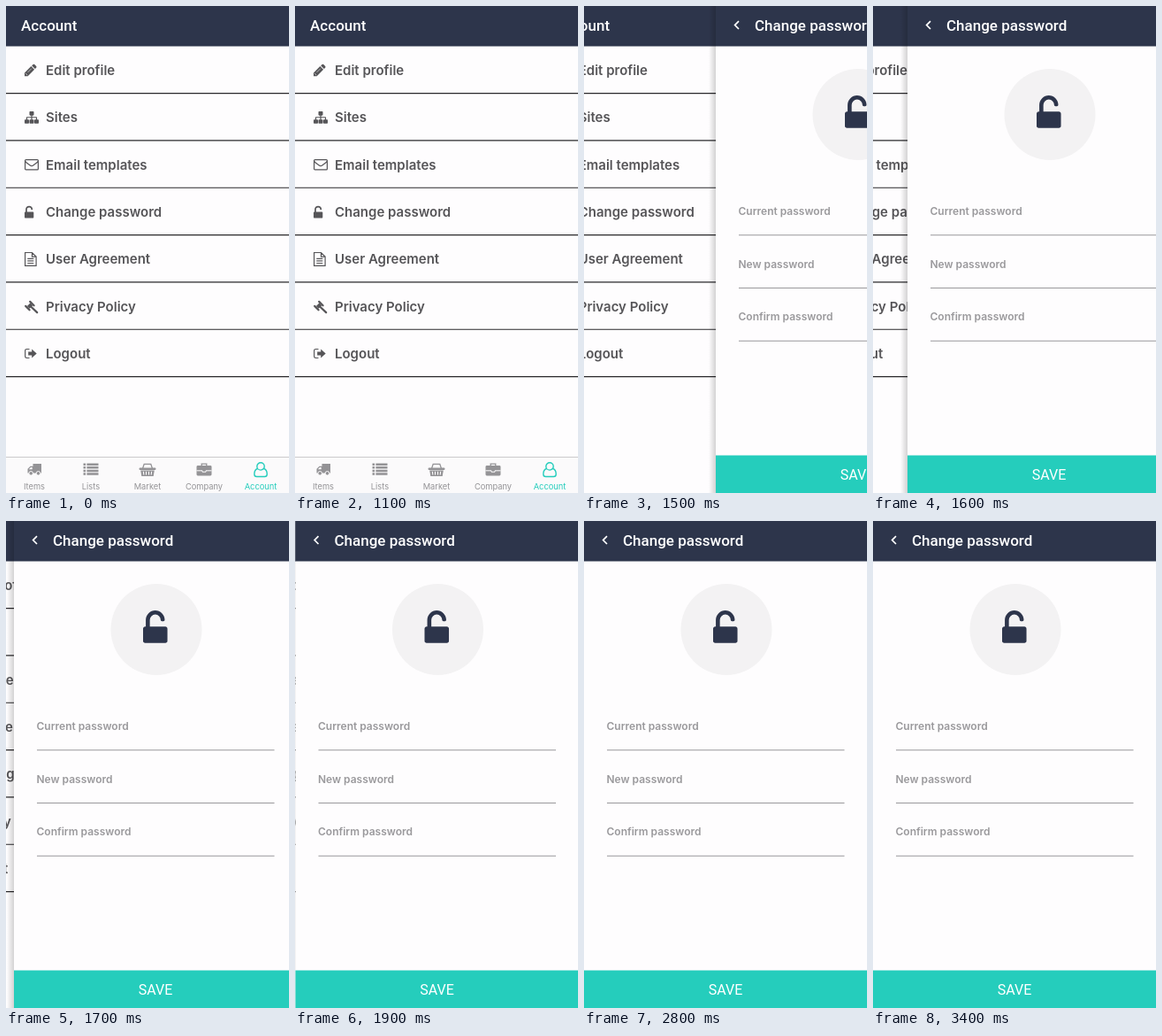
Animation, 320 px wide and 550 px high, one loop 4 s. Source, as an HTML page:

```html
<!DOCTYPE html>
<html lang="en">
<head>
<meta charset="utf-8">
<title>Change password</title>
<style>
  html, body { margin: 0; width: 100%; height: 100%; overflow: hidden; background: #fefdfe; }
  svg { display: block; width: 320px; height: 550px; }
  .title { font: 500 17px Roboto, sans-serif; fill: #fff; }
  .row { font: 600 15px Inter, sans-serif; fill: #565558; }
  .tab { font: 400 9.3px Inter, sans-serif; fill: #949396; text-anchor: middle; }
  .tab.on { fill: #25cdbc; }
  .label { font: 600 12px Inter, sans-serif; fill: #9a999c; }
  .save { font: 400 16px Roboto, sans-serif; fill: #fff; text-anchor: middle; }
  .o { fill: none; stroke: #565558; stroke-width: 1.2; }
  .bg { fill: #fefdfe; }
  .cut { fill: none; stroke: #fefdfe; }
</style>
</head>
<body>
<svg viewBox="0 0 320 550">
  <defs>
    <linearGradient id="fade">
      <stop offset="0" stop-color="#000" stop-opacity="0"/>
      <stop offset="1" stop-color="#000" stop-opacity=".17"/>
    </linearGradient>
    <path id="lock" d="M1056 768q40 0 68 28t28 68v576q0 40-28 68t-68 28H96q-40 0-68-28t-28-68V864q0-40 28-68t68-28h32V448q0-185 131.500-316.500T576 0t316.500 131.500T1024 448q0 26-19 45t-45 19h-64q-26 0-45-19t-19-45q0-106-75-181t-181-75-181 75-75 181v320z"/>
  </defs>
  <g id="menu">
    <path class="bg" d="M0 0H320V550H0z"/>
    <path fill="#2d354b" d="M0 0H320V45.500H0z"/>
    <text class="title" x="17" y="28">Account</text>
    <g id="rows"></g>
  </g>
  <g id="tabs">
    <path fill="#fbfafb" d="M0 510H320V550H0z"/>
    <path fill="#cbcacc" d="M0 509H320V510H0z"/>
  </g>
  <g id="form">
    <path fill="url(#fade)" d="M-8 0H0V550H-8z"/>
    <path class="bg" d="M0 0H320V550H0z"/>
    <path fill="#2d354b" d="M0 0H320V45.500H0z"/>
    <path d="M26 17.200L21.600 21.600 26 26" fill="none" stroke="#fff" stroke-width="1.700"/>
    <text class="title" x="44" y="28">Change password</text>
    <circle cx="161" cy="122.500" r="51.500" fill="#f3f2f3"/>
    <use href="#lock" fill="#2d354b" transform="translate(146 101) scale(.0239)"/>
    <g id="fields"></g>
    <path fill="#25cdbc" d="M0 507.500H320V550H0z"/>
    <text class="save" x="160" y="534.500">SAVE</text>
  </g>
</svg>
<script>
const $ = id => document.getElementById(id);
const put = (id, html) => $(id).insertAdjacentHTML('beforeend', html);

const rows = [
  ['Edit profile', `<path d="M0 13.500V9.800L7.400 2.400 11.100 6.100 3.700 13.500zM8.200 1.700L9.500.4q.9-.8 1.800 0L13.200 2.300q.7.900 0 1.700L11.900 5.300z"/>
    <path class="cut" d="M1 10.200L3.300 12.500M3.600 9.200L7.800 5" stroke-width=".6"/>`],
  ['Sites', `<path d="M6.300 0h3.400q.8 0 .8.800v3q0 .8-.8.800H6.300q-.8 0-.8-.8v-3q0-.8.8-.8z"/>
    <path class="o" d="M8 4V10M2.500 10V7q0-.3.300-.3H13.200q.3 0 .3.300V10"/>` +
    [0, 5.5, 11].map(x => `<rect x="${x}" y="9.100" width="5" height="4.600" rx=".8"/>`).join('')],
  ['Email templates', `<rect class="o" x=".6" y="1.200" width="14.800" height="11.400" rx="1"/>
    <path class="o" d="M.6 3.200C2.500 5 4.500 6.300 6.300 7.700Q8 9 9.700 7.700C11.500 6.300 13.500 5 15.400 3.200"/>`],
  ['Change password', '<use href="#lock" transform="scale(.00893)"/>'],
  ['User Agreement', `<path class="o" d="M.6-.5H8.500L13.100 4.100V14.300H.6zM8.500-.5V4.100H13.100M3.300 6.300h7M3.300 8.900h7M3.300 11.500h7"/>`],
  ['Privacy Policy', `<path d="M2.900 6.700L6.400 3.200 9.200 6 5.700 9.500z"/>
    <path d="M1.200 6.500L5.600 10.900M6.200 1.500L10.600 5.900M7.400 7.400L14.200 13.800" fill="none" stroke="#565558" stroke-width="2.200" stroke-linecap="round"/>`],
  ['Logout', `<path class="o" d="M5.500 1.800H2.600Q.7 1.800.7 3.700V9.900Q.7 11.800 2.600 11.800H5.500" stroke-width="1.300"/>
    <path d="M4.200 4.900H8.200V1.800L13.700 6.800 8.200 11.800V8.700H4.200z"/>`]
];
rows.forEach(([name, icon], i) => put('rows', `<g class="row" transform="translate(0 ${i * 53.33})">
  <g transform="translate(21 65.700)">${icon}</g>
  <text x="45" y="78">${name}</text>
  <path fill="#29282b" d="M0 98H320V99.200H0z"/></g>`));

const tabs = [
  ['Items', `<path d="M7 .5H16.500V11H1V6.300L4 3.200H7z"/>
    <path class="bg" d="M2.300 6.800L4.500 4.500H6.200V6.800z"/>
    <g stroke="#fbfafb"><circle cx="4.700" cy="11.300" r="2.300"/><circle cx="13" cy="11.300" r="2.300"/></g>`],
  ['Lists', [0, 3.6, 7.2, 10.8].map(y => `<path d="M0 ${y}h2.600v2.500h-2.600zM3.900 ${y}h13.100v2.500H3.900z"/>`).join('')],
  ['Market', `<path d="M3 6L4.700.9H12.300L14 6" fill="none" stroke="#949396" stroke-width="1.300"/>
    <rect x="-1" y="5" width="19" height="2.500" rx="1.200"/>
    <path d="M.7 8H16.300L15.200 14.600H1.800z"/>
    <path class="cut" d="M3.900 9.300L4.300 13M7 9.300V13M10 9.300V13M13.100 9.300L12.700 13" stroke-width="1.100"/>`],
  ['Company', `<path d="M5.700 3V.7H11.300V3" fill="none" stroke="#949396" stroke-width="1.300"/>
    <rect y="2.500" width="17" height="11.500" rx="1.400"/>
    <path class="cut" d="M0 8.300H6.500V9.700H10.500V8.300H17"/>`],
  ['Account', `<g fill="none" stroke="#25cdbc" stroke-width="1.400"><path d="M5.200 6C2 6.700 1.300 9.800 1.300 12.200Q1.300 15 4 15H13Q15.700 15 15.700 12.200C15.700 9.800 15 6.700 11.800 6"/>
    <circle cx="8.500" cy="3.400" r="4.200"/></g>`]
];
tabs.forEach(([name, icon], i) => put('tabs', `<g class="tab${i == 4 ? ' on' : ''}" transform="translate(${i * 64} 0)">
  <g transform="translate(23.500 516.500)">${icon}</g><text x="32" y="546">${name}</text></g>`));

['Current', 'New', 'Confirm'].forEach((name, i) => put('fields', `<g transform="translate(0 ${i * 59.75})">
  <text class="label" x="25.500" y="235.800">${name} password</text>
  <path fill="#99989b" d="M26 258.200H294.500V259.200H26z"/></g>`));

// Critically damped spring, sampled ten times a second on half pixels
function offset(t) {
  if (t < 1403) return 320;
  if (t >= 2100) return 0;
  const k = (t - 1403) * .0185;
  return Math.ceil(640 * (1 + k) * Math.exp(-k)) / 2;
}

function draw() {
  const t = Math.floor(performance.now() % 4000 / 100) * 100;
  const x = offset(t);
  $('menu').setAttribute('transform', `translate(${(x - 320) * .3} 0)`);
  $('form').setAttribute('transform', `translate(${x} 0)`);
  $('form').style.display = x < 320 ? '' : 'none';
  $('tabs').style.display = x < 320 ? 'none' : '';
  requestAnimationFrame(draw);
}
draw();
</script>
</body>
</html>
```
